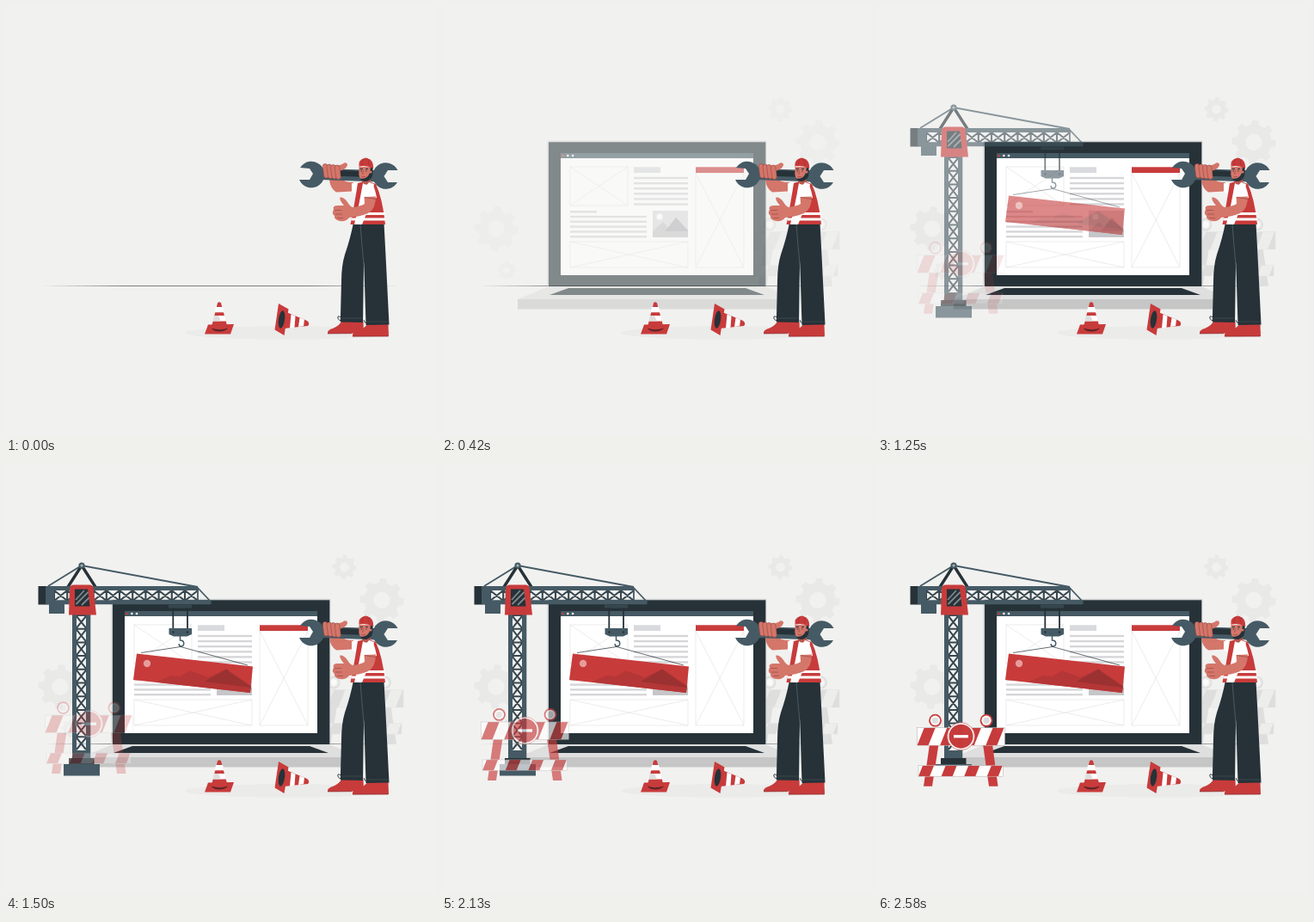
An HTML page for the animation above (2620 ms loop, 500 px wide and 500 px high).

```html
<!DOCTYPE html>
<html lang="en">
<head>
<meta charset="utf-8">
<title>Under construction</title>
<style>
html, body { margin: 0; width: 100%; height: 100%; overflow: hidden; background: #f1f1f0; }
svg { display: block; width: 100%; height: 100%; }
</style>
</head>
<body>
<svg id="stage" viewBox="0 0 500 500"></svg>
<script>
const LOOP = 2620;
const RED = '#c83b3b', DARK = '#263238', STEEL = '#455a64', SKIN = '#d4766a', CREASE = '#9a4a45';
const BG = '#f1f1f0', GEAR = '#e9e9e8';

const rect = (x, y, w, h, fill, more = '') =>
  `<rect x="${x}" y="${y}" width="${w}" height="${h}" fill="${fill}" ${more}/>`;
const path = (d, fill, more = '') => `<path d="${d}" fill="${fill}" ${more}/>`;
const line = (d, color, width, more = '') =>
  `<path d="${d}" fill="none" stroke="${color}" stroke-width="${width}" ${more}/>`;
const dot = (x, y, r, fill, more = '') => `<circle cx="${x}" cy="${y}" r="${r}" fill="${fill}" ${more}/>`;
const group = (id, body) => `<g id="${id}">${body}</g>`;
const repeat = (n, fn) => Array.from({ length: n }, (_, i) => fn(i)).join('');

function gear(x, y, r) {
  const teeth = repeat(8, i =>
    path(`M${-r * .2} ${-r * .7}L${-r * .15} ${-r}H${r * .15}L${r * .2} ${-r * .7}Z`, GEAR,
      `transform="rotate(${i * 45 + 4})"`));
  return `<g transform="translate(${x} ${y})">${teeth}
    <circle r="${r * .59}" fill="none" stroke="${GEAR}" stroke-width="${r * .42}"/></g>`;
}

function placeholder(x, y, w, h) {
  return line(`M${x} ${y}h${w}v${h}h${-w}ZL${x + w} ${y + h}M${x + w} ${y}L${x} ${y + h}`, '#e4e4e6', .7);
}

function laptop() {
  const rule = '#d6d6d9';
  return path('M124 326H376L411 341H88Z', '#dfdfdf') + rect(88, 341, 324, 11.5, '#c6c6c6')
    + path('M147 328H353L375 336H125Z', DARK)
    + rect(122.3, 156.8, 255, 169.4, '#cfd2d1', 'rx="1"')
    + rect(124, 158.3, 252.3, 167.7, DARK) + rect(138, 171, 224, 142, '#fff') + rect(138, 171, 224, 6, STEEL)
    + dot(140.5, 174, 1.3, RED) + dot(146.3, 174, 1.3, '#fff') + dot(152, 174, 1.3, '#fff')
    + placeholder(149, 187, 67, 45) + placeholder(295, 194, 56, 110) + placeholder(149, 274, 137, 30)
    + rect(223, 187.3, 31, 6.7, '#d9dade') + rect(295, 187.3, 56, 6.7, RED)
    + repeat(6, i => rect(223, 198.8 + i * 6.1, 63, 2.4, rule))
    + rect(149, 238, 31, 2.5, rule)
    + repeat(5, i => rect(149, 243.8 + i * 5.8, 89, 2.4, rule))
    + rect(245, 238, 41, 31, '#dcdcde') + dot(253, 245, 3.6, '#fff')
    + path('M245 262L257 251L265 260L272 246L286 261V269H245Z', '#c6c6c9')
    + path('M259 262L272 246L286 261V262Z', '#b3b3b7');
}

function crane() {
  const brace = '#37474f';
  const arm = repeat(11, i => {
    const x = 56 + i * 15.2;
    return `M${x} 146V159M${x} 147L${x + 15.2} 159M${x + 15.2} 147L${x} 159`;
  });
  const tower = repeat(10, i => {
    const y = 176 + i * 15.7;
    return `M82 ${y}H93M82 ${y + 1}L93 ${y + 14.7}M93 ${y + 1}L82 ${y + 14.7}`;
  });
  return line('M49 142L88 118L223 143', STEEL, 1.8)
    + line('M72 143L88 118L104 143', DARK, 3.4)
    + dot(88, 118, 3.6, STEEL) + dot(88, 118, 1.6, '#a8b0b3')
    + line(tower, brace, 2) + rect(77, 172, 5, 170, STEEL) + rect(93, 172, 5.3, 170, STEEL)
    + rect(80, 333, 16, 10, STEEL)
    + rect(73, 342, 29.5, 7, DARK) + rect(67, 349, 42, 13.5, STEEL)
    + rect(50, 162, 18, 12, STEEL) + rect(37.5, 142, 9, 21.5, DARK)
    + line(arm, brace, 2.1) + rect(46, 142, 10, 21.5, STEEL) + rect(46, 142, 177, 5, STEEL)
    + path('M46 158.2H238.5V163.2H46Z', STEEL)
    + line('M222 143L238 160M223 145V159', STEEL, 1.8)
    + path('M79 140.5H97Q101 140.5 101.6 144L105 175.5H73L74 145Q74 140.5 79 140.5Z', RED)
    + path('M80 145.5H95L97.5 165.5H80Z', DARK)
    + line('M81 158L91 147M81.5 163L95.5 149M88 164L96.5 155.5', '#7d898e', 1.8)
    + rect(189, 163.5, 27, 4, brace)
    + line('M194.3 167V192M211 167V192', DARK, 1.8)
    + path('M189.5 191H216V198L210.5 200.5H195L189.5 198Z', STEEL)
    + dot(194.5, 195.5, 1.2, DARK) + dot(211, 195.5, 1.2, DARK)
    + line('M202.5 200V205C208 205 208 212 203.5 212Q201 212 201.2 209', STEEL, 1.5)
    + line('M157 219.5L203 212.5L281 234', DARK, .7)
    + path('M152 220.5L287 235.5L284 266L148 251Z', RED)
    + path('M174 253.5L192 246L202 247L214 240.5L225 244L235 248L256 238.5L285 258L284 266Z', '#b53636')
    + path('M231 253L256 238.5L285 259L284.5 260Z', '#9c3131')
    + dot(164, 232, 4.2, '#e59c9b');
}

// A board whose stripes lean to the right.
function board(x, y, w, h, look, clip) {
  return `<clipPath id="${clip}">${rect(x, y, w, h, '#000')}</clipPath>
    ${rect(x, y, w, h, look.paper)}<g clip-path="url(#${clip})">`
    + repeat(5, i =>
      path(`M${x + look.phase + i * 26.6} ${y + h}l${h * .4} ${-h}h13l${-h * .4} ${h}Z`, look.color))
    + '</g>' + rect(x, y, w, h, 'none', `stroke="${look.edge}" stroke-width=".5"`);
}

function barrier(name, look) {
  const { color, paper, glass, lowY } = look;
  const foot = lowY + 24;
  const lamp = x => dot(x, 298.5, 7.4, color) + dot(x, 298.5, 5.6, paper) + dot(x, 298.5, 3.7, glass);
  return lamp(66.5) + lamp(126)
    + path(`M60 326H70.5L63 ${foot}H53Z`, color) + path(`M122 326H133L139.5 ${foot}H129Z`, color)
    + board(45.5, 307, 102, 20.5, look, name + 'Top')
    + board(47, lowY, 98.5, 12.5, look, name + 'Low');
}

const bright = { color: RED, paper: '#fff', edge: '#b6a8a8', glass: '#dedede', phase: 0, lowY: 351 };
const faded = { color: '#dedede', paper: '#ededec', edge: '#e2e2e2', glass: '#fafafa', phase: 13.3, lowY: 346 };

function sign() {
  return dot(96.5, 317, 16, '#fff', 'stroke="#b84a48" stroke-width=".6"')
    + dot(96.5, 317, 14, RED) + rect(88, 315.4, 17, 3.3, '#fff');
}

function cones() {
  return path('M235 370.5L265 370L261 381.5H231Z', RED)
    + path('M246 345.5Q248 343 250 345.5L258 375Q248 379 238.5 375Z', RED)
    + path('M239 374.5Q248 378 258 374.5Q255 378.5 248 378.5T239 374.5Z', '#5b2528')
    + path('M244.1 350H252L253.5 356.2H242.6Z', '#fff')
    + path('M241.7 360H254.4L256 366.5H240.3Z', '#fff')
    + path('M241.7 360H247L250 366.5H240.3Z', '#dedede')
    + path('M317 346L328.5 352.5L323.5 383L312.5 376.5Z', RED)
    + path('M326 356L349 365.5Q353 367 352 371Q351 372.5 348 372.2L323 375Z', RED)
    + path('M331.5 358.4L336.5 360.4L335.5 373.7L330 374.4Z', '#fff')
    + path('M341.5 362.4L347 364.8L346 372.3L340 373.1Z', '#fff')
    + `<ellipse cx="320.5" cy="364.5" rx="3.6" ry="10.3" fill="${DARK}" transform="rotate(8 320.5 364.5)"/>`;
}

function wrench() {
  return path('M342 188L353 189L357 195L353 202H341A15.3 15.3 0 1 0 342 188Z', STEEL)
    + path('M455.5 191H444L439.5 198L444 205H455A15.3 15.3 0 1 1 455.5 191Z', STEEL)
    + path('M366 189L432 191V204.5L366 202Z', STEEL)
    + path('M374 190.5L424 192.5V199L374 197.5Z', DARK);
}

function fist() {
  return path('M382 186Q390 185 393 182.5Q397 181.5 397 185Q396 189 389 191.5L388 199H380Z', SKIN)
    + repeat(4, i => rect(369 + i * 4.6, 183.5 + i * .5, 5.6, 16.5, SKIN,
      `rx="2.7" stroke="${CREASE}" stroke-width=".6" transform="rotate(-7 ${372 + i * 4.6} 192)"`));
}

function legs() {
  return path('M374 381Q373 376.5 381 374.5Q387 372 390 367H415.5L416 380.5Z', RED)
    + path('M403 384.3Q402 379 410 377Q417 375 420 370H444.5L445 384Z', RED)
    + line('M374 380.9L402 380.7M403 384H444.5', '#8f2c2e', .8)
    + line('M390 366Q385 365 386 361Q389 360 392 366M420 369Q416 368 416 365', DARK, .9)
    + path('M404 252Q400 272 394 289Q390 302 390 320L388.8 367.5L415 368L416 300L419 252Z', DARK)
    + path('M412 252H439.5L442 300L445.5 370.5L418.5 371L416.3 300Z', DARK)
    + line('M412 254Q414 280 416.2 302', '#55656c', .8)
    + line('M389.5 363H414M419 367H445', '#4a5960', .5);
}

function head() {
  return path('M414 196H424V206Q418 210 414 205Z', '#b9584f')
    + path('M410.5 187H425V198Q423 203 417 203Q411 202 410.3 196Z', SKIN)
    + path('M424 187H426.5V195Q426 202 419 204Q413 204 412 200.5Q420 202 423 194Z', DARK)
    + line('M411.5 189.5H415M418 189.5H421', DARK, 1)
    + dot(413.2, 191.7, .7, DARK) + dot(419, 191.7, .7, DARK)
    + line('M415.5 191L414.7 195H416M413.5 198.5H418', CREASE, .7)
    + dot(424, 193, 1.5, SKIN)
    + path('M410.5 187Q409.5 179 416 177.3Q418 175.5 420.5 177.3Q427.5 179 427.3 189Q418 184 409.5 187Z', RED)
    + line('M416 177.5Q414 181 414.2 185M420.5 177.5Q422 181 421.8 185.5', '#a52f31', .7);
}

function worker() {
  const farArm = path('M376 202Q377 212 384 216.5L402 215.5L404 205Q392 205 390 200Z', SKIN)
    + path('M402 206L414 205L412 221L402 216Z', '#fff');
  const torso = path('M409 206Q420 202 430 207Q438 224 441 254H400.5Q405 232 409 206Z', RED)
    + path('M415 206Q421 204 428 207L424 230L414 254H405Q411 230 415 206Z', '#fff')
    + path('M402.5 240H440L440.5 243H402ZM401.8 246.5H440.8L441 249.5H401.3Z', '#fff');
  const nearArm = path('M422 205Q428 205 431 223L416 227Q415 212 422 205Z', '#fff')
    + path('M416.5 222L430 221.5Q430 236 421 241Q412 245 399 246Q396 251 388 250Q381 248 382 244Q378 241 381 237Q379 232 386 232L393 232Q387 225 388.5 222.5Q393 222 397 228Q400 233 403 234Q412 233 417 230Z', SKIN)
    + line('M382 237.5H390M383 242H391M385 246.5H392M417 222.5L430 224.5', CREASE, .7);
  return legs() + farArm + torso + wrench() + head() + fist() + nearArm;
}

const stage = document.getElementById('stage');
stage.innerHTML = rect(0, 0, 500, 500, BG)
  + group('scenery', gear(63, 259, 25.5) + gear(75, 307.5, 10.5) + gear(393.5, 120, 14) + gear(437, 158.5, 25.5)
    + `<g transform="translate(314.5 -44.5)">${barrier('faded', faded)}</g>`)
  + path('M43 325.4L140 325.1L250 324.9L350 325.1L456 325.4L350 325.9L250 326.1L140 325.9Z', '#7c8080')
  + group('laptop', laptop())
  + `<ellipse cx="328" cy="380" rx="120" ry="7.8" fill="#ebebea"/>`
  + group('crane', crane())
  + group('barrier', barrier('bright', bright) + sign())
  + cones() + worker();

const el = id => document.getElementById(id);
const scenery = el('scenery'), computer = el('laptop'), hoist = el('crane'), fence = el('barrier');
const progress = (t, from, to) => Math.min(1, Math.max(0, (t - from) / (to - from)));

function draw(t) {
  const base = progress(t, 110, 680);
  const drop = progress(t, 800, 2600) ** 1.45;
  scenery.setAttribute('opacity', base);
  computer.setAttribute('opacity', base);
  hoist.setAttribute('opacity', progress(t, 880, 1500));
  fence.setAttribute('opacity', drop);
  fence.setAttribute('transform', `translate(0 ${-20 * (1 - drop)})`);
}

const start = performance.now();
function tick() {
  draw((performance.now() - start) % LOOP);
  requestAnimationFrame(tick);
}
tick();
</script>
</body>
</html>
```
